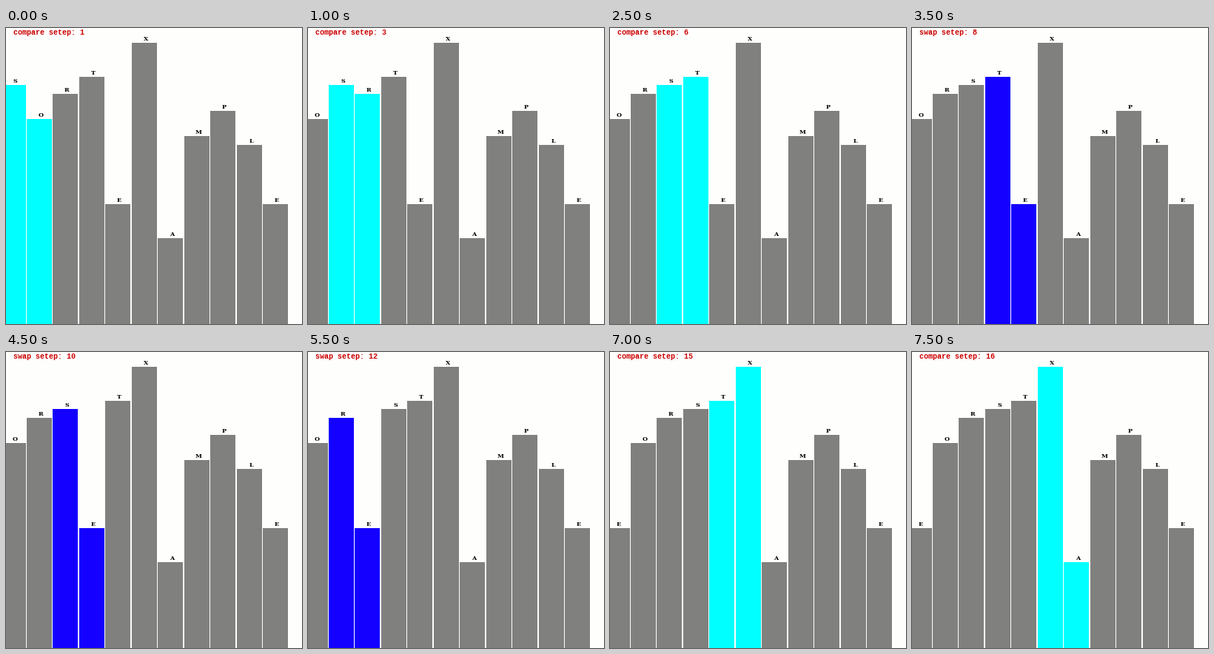
These frames come from a looping animation (400x400 px, 8 s). A matplotlib script:

```python
import matplotlib.pyplot as plt
from matplotlib.animation import FuncAnimation
from matplotlib.patches import Rectangle

SIZE, DPI = 400, 100
WORD = "SORTEXAMPLE"
STEPS = 16
BAR_W, PITCH = 34, 35.5
GREY, CYAN, BLUE, RED = "#80807e", "#00ffff", "#1400ff", "#cc0000"
PAPER = "#fefefd"


def px(n):
    """Font size in points for a size in pixels."""
    return n * 72 / DPI


def bar_left(i):
    return int(PITCH * i - 7.3)


def bar_top(letter):
    return round(20 + 264 / 23 * (ord("X") - ord(letter)))


def insertion_sort(word):
    """Yield (action, order, left index) before each step takes place."""
    a = list(word)
    for i in range(1, len(a)):
        for j in range(i, 0, -1):
            yield "compare", a[:], j - 1
            if a[j - 1] <= a[j]:
                break
            yield "swap", a[:], j - 1
            a[j - 1], a[j] = a[j], a[j - 1]


steps = list(insertion_sort(WORD))[:STEPS]

fig = plt.figure(figsize=(SIZE / DPI, SIZE / DPI), dpi=DPI, facecolor=PAPER)
ax = fig.add_axes([0, 0, 1, 1])
ax.set_xlim(0, SIZE)
ax.set_ylim(SIZE, 0)
ax.axis("off")

bars, labels = [], []
for i in range(len(WORD)):
    x = bar_left(i)
    bar = Rectangle((x, 0), BAR_W, SIZE, lw=0, antialiased=False)
    bars.append(ax.add_patch(bar))
    labels.append(ax.text(x + 19, 0, "", ha="center", va="baseline",
                          family="DejaVu Serif", weight="bold",
                          size=px(8), color="black"))
title = ax.text(10, 9, "", ha="left", va="baseline", color=RED,
                family="Liberation Mono", weight="bold", size=px(10))


def draw(k):
    action, order, at = steps[k]
    active = CYAN if action == "compare" else BLUE
    for i, letter in enumerate(order):
        top = bar_top(letter)
        bars[i].set_y(top)
        bars[i].set_height(SIZE - top)
        bars[i].set_facecolor(active if i in (at, at + 1) else GREY)
        labels[i].set_text(letter)
        labels[i].set_y(top - 3)
    title.set_text(f"{action} setep: {k + 1}")
    return [*bars, *labels, title]


anim = FuncAnimation(fig, draw, frames=STEPS, interval=500,
                     repeat=True, repeat_delay=0)
plt.show()
```
